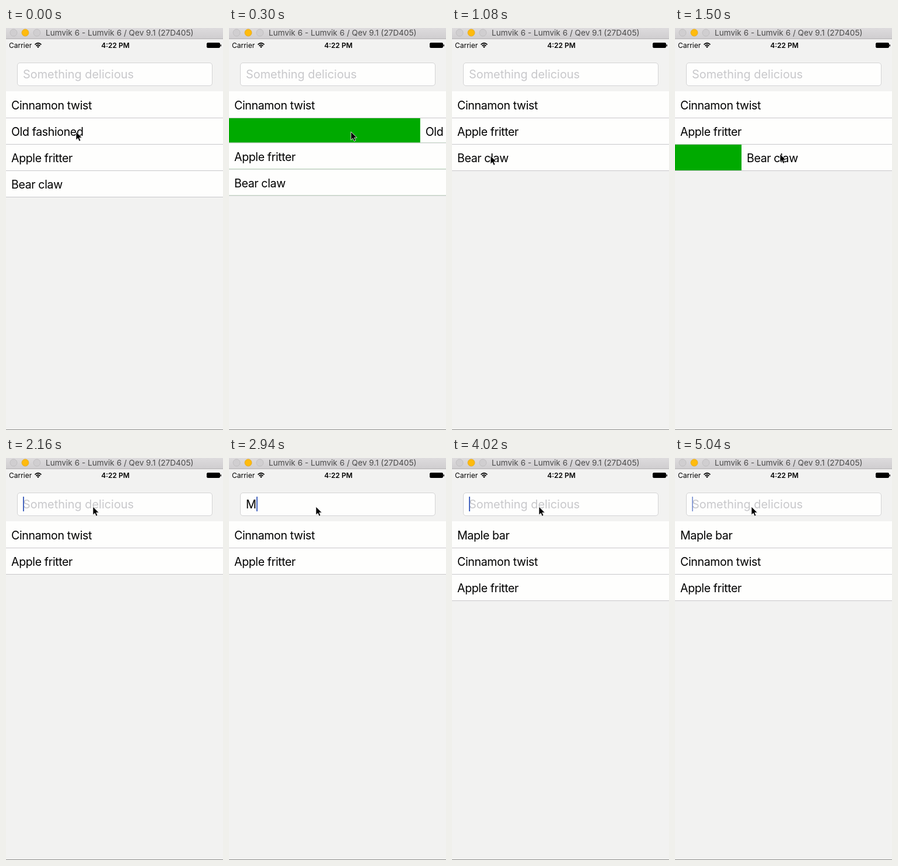
An HTML page for the animation above (5100 ms loop, 372 px wide and 686 px high).

```html
<!DOCTYPE html>
<html lang="en">
<head>
<meta charset="utf-8">
<title>Snack list</title>
<style>
  html, body { margin: 0; width: 100%; height: 100%; overflow: hidden; background: #f2f2f1; }
  svg { display: block; width: 372px; height: 686px; }
  text { font-family: Inter, "Open Sans", sans-serif; white-space: pre; }
  .label { font-size: 19.6px; letter-spacing: -.02em; }
  .field { font-size: 19.9px; }
  .status { font-size: 12px; }
</style>
</head>
<body>
<svg id="stage" viewBox="0 0 372 686">
  <defs>
    <linearGradient id="bar" x2="0" y2="1">
      <stop stop-color="#dddbdd"/><stop offset="1" stop-color="#cfcdcf"/>
    </linearGradient>
  </defs>
  <rect width="372" height="686" fill="#f2f2f1"/>
  <g id="list"></g>
  <g id="lines"></g>

  <rect width="372" height="19" fill="url(#bar)"/>
  <rect y="18" width="372" height="1" fill="#b4b2b4"/>
  <g stroke-width=".8">
    <circle cx="13" cy="8" r="6" fill="#d0ced0" stroke="#bcbabc"/>
    <circle cx="33" cy="8" r="6" fill="#ffbb0d" stroke="#e0a520"/>
    <circle cx="53" cy="8" r="6" fill="#d0ced0" stroke="#bcbabc"/>
  </g>
  <text x="68" y="13" font-size="13.6" fill="#4a4a4a">Lumvik 6 - Lumvik 6 / Qev 9.1 (27D405)</text>

  <text class="status" x="5" y="34">Carrier</text>
  <g fill="none" stroke="#000" stroke-width="1.7">
    <path d="M49.5 28.3Q55 23.2 60.5 28.3M51.6 30.6Q55 27.4 58.4 30.6"/>
    <path d="M53 31.9Q55 30.3 57 31.9L55 34Z" fill="#000" stroke="none"/>
  </g>
  <text class="status" x="187.5" y="34" text-anchor="middle" font-weight="600">4:22 PM</text>
  <rect x="344.5" y="25.5" width="22" height="8" rx="1.5" stroke="#000"/>
  <rect x="367.5" y="28" width="1.5" height="3.5" rx=".7"/>

  <rect x="19.5" y="59.5" width="334" height="39" rx="4.5" fill="#fefefd" stroke="#d3d3d4"/>
  <text id="hint" class="field" x="29" y="86" fill="#c8c8cb">Something delicious</text>
  <text id="typed" class="field" x="29" y="86"></text>
  <rect id="caret" y="66" width="2" height="25" fill="#4867c0"/>

  <rect y="685" width="372" height="1" fill="#8c8c8c"/>
  <path id="cursor" d="M0 0V14.2L3.3 11.2L5.5 16.3L8 15.2L5.8 10.2H10.3Z" fill="#000" stroke="#fff" stroke-width=".8"/>
</svg>
<script>
const LOOP = 5100, STEP = 60, ROW = 45, TOP = 108, WIDTH = 372;
const WORD = "Maple bar", TYPE_AT = 2880, KEY_MS = 105, ENTER_AT = 3840, FOCUS_AT = 2100;
const $ = id => document.getElementById(id);
const smooth = p => p * p * (3 - 2 * p);

// Eased value at time t from a list of [time, value] keys.
function at(keys, t) {
  if (t <= keys[0][0]) return keys[0][1];
  for (let i = 1; i < keys.length; i++) {
    const [t0, v0] = keys[i - 1], [t1, v1] = keys[i];
    if (t < t1) return v0 + (v1 - v0) * smooth((t - t0) / (t1 - t0));
  }
  return keys[keys.length - 1][1];
}

const cursorX = [[0, 120], [210, 209], [600, 209], [1020, 66], [1140, 66], [1500, 180],
  [1680, 180], [2040, 149], [4440, 149], [4980, 131]];
const cursorY = [[0, 177], [600, 177], [1020, 218], [1140, 218], [1500, 215],
  [1680, 215], [2040, 83]];

// slide: content offset; size: share of full row height.
const rows = [
  { name: WORD, size: [[ENTER_AT - 60, 0], [4020, 1]] },
  { name: "Cinnamon twist" },
  { name: "Old fashioned", slide: [[0, 0], [210, 89], [330, WIDTH]], size: [[270, 1], [480, 0]] },
  { name: "Apple fritter" },
  { name: "Bear claw", slide: [[1140, 0], [1500, 114], [1560, 114], [1740, WIDTH]],
    size: [[1710, 1], [1950, 0]] }
];

function add(parent, tag, attrs) {
  const el = document.createElementNS("http://www.w3.org/2000/svg", tag);
  for (const k in attrs) el.setAttribute(k, attrs[k]);
  return parent.appendChild(el);
}

for (const row of rows) {
  row.el = add($("list"), "svg", { width: WIDTH, overflow: "hidden" });
  add(row.el, "rect", { width: WIDTH, height: ROW, fill: "#00aa00" });
  row.content = add(row.el, "g", {});
  add(row.content, "rect", { width: WIDTH, height: ROW, fill: "#fefefd" });
  add(row.content, "text", { class: "label", x: 9, y: 31 }).textContent = row.name;
  row.line = add($("lines"), "rect", { width: WIDTH, height: 1, fill: "#c8c7ca" });
}

function drawRows(t) {
  let y = TOP;
  for (const row of rows) {
    const h = ROW * (row.size ? at(row.size, t) : 1);
    const shown = h > 0.2 ? "inline" : "none";
    row.el.setAttribute("y", y);
    // The nested svg is sized in CSS too, so the style carries its height.
    row.el.style.height = h + "px";
    row.el.style.display = row.line.style.display = shown;
    row.content.setAttribute("transform", `translate(${row.slide ? at(row.slide, t) : 0})`);
    y += h;
    row.line.setAttribute("y", y);
  }
}

function caretAlpha(t) {
  if (t < FOCUS_AT) return 0;
  if (t >= TYPE_AT && t < ENTER_AT) return 1;
  const age = (t - (t < TYPE_AT ? FOCUS_AT : ENTER_AT + 60)) % 1200;
  return at([[500, 1], [700, 0], [1060, 0], [1200, 1]], age);
}

function drawField(t) {
  const typing = t >= TYPE_AT && t < ENTER_AT;
  const text = typing ? WORD.slice(0, 1 + Math.floor((t - TYPE_AT) / KEY_MS)) : "";
  $("typed").textContent = text;
  $("hint").style.display = text ? "none" : "inline";
  $("caret").setAttribute("x", 29 + (text ? $("typed").getComputedTextLength() : 0));
  $("caret").setAttribute("opacity", caretAlpha(t));
}

function draw(now) {
  const t = Math.floor((now % LOOP) / STEP) * STEP;
  drawRows(t);
  drawField(t);
  $("cursor").setAttribute("transform", `translate(${at(cursorX, t)} ${at(cursorY, t)})`);
}

const start = performance.now();
function tick() {
  draw(performance.now() - start);
  requestAnimationFrame(tick);
}
tick();
</script>
</body>
</html>
```
